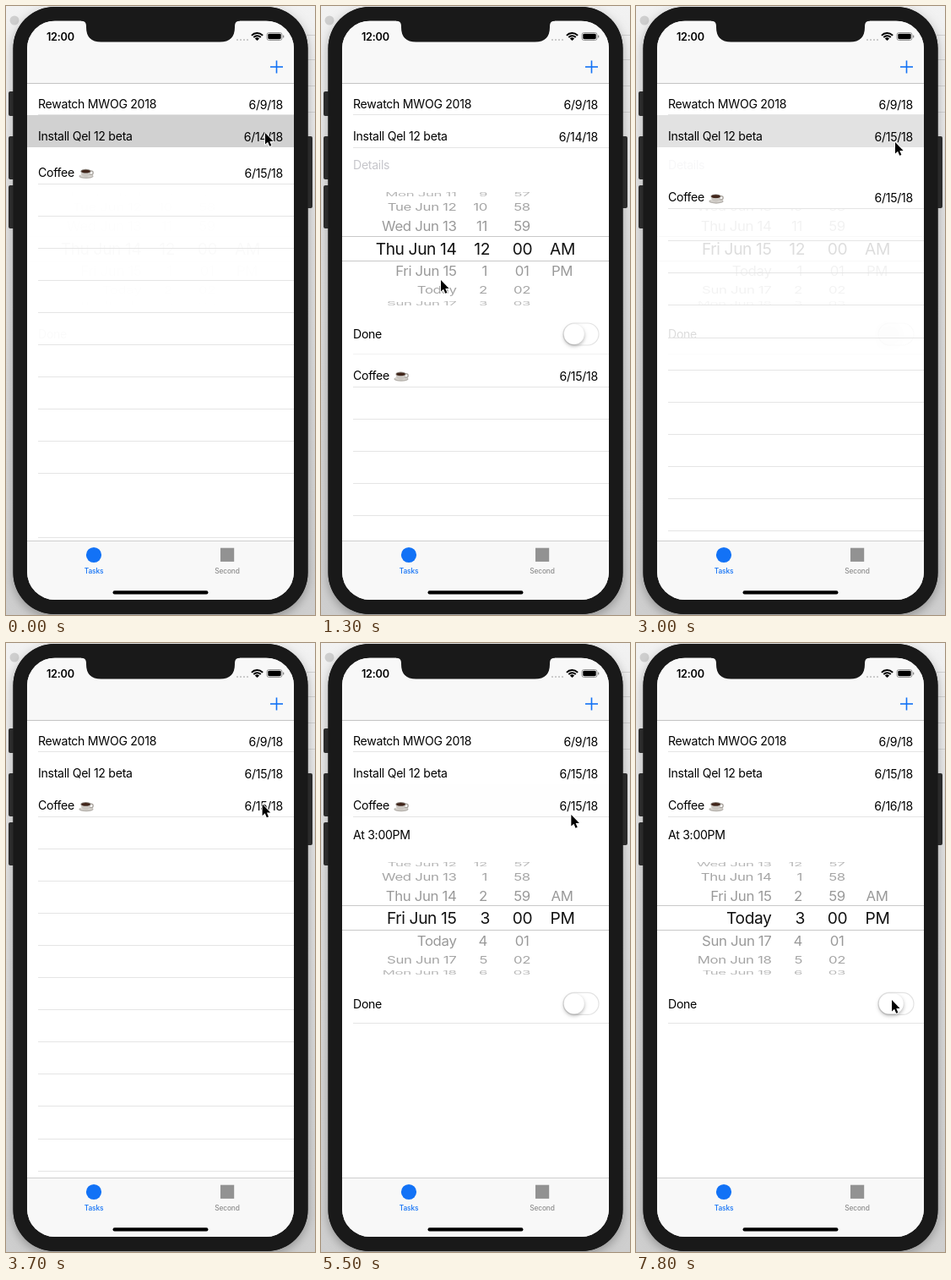
Animation of 366 by 720 pixels, one loop 8 s. Source, as an HTML page with a canvas:

```html
<!DOCTYPE html>
<html lang="en">
<head>
<meta charset="utf-8">
<title>Task list</title>
<style>
html, body { margin: 0; width: 100%; height: 100%; overflow: hidden; background: #e4e4e4; }
canvas { display: block; width: 366px; height: 720px; }
</style>
</head>
<body>
<canvas id="stage"></canvas>
<script>
const LOOP = 8000, STEP = 100;
const ROW = 38.05, PANEL = 244.5;
const TOP = 17.5, BOTTOM = 702;
const BLUE = '#1272f6', BODY = '#191919', LINE = '#e5e5e5';
const canvas = document.getElementById('stage');
const ctx = canvas.getContext('2d');
const dpr = window.devicePixelRatio || 1;
canvas.width = 366 * dpr;
canvas.height = 720 * dpr;

const ease = u => {
  u = Math.min(1, Math.max(0, u));
  return u * u * (3 - 2 * u);
};
const mix = (a, b, u) => a + (b - a) * u;

// Pointer moves: start time, end time, target position
const POINTER_START = [307, 150];
const MOVES = [
  [400, 900, 141, 323],
  [950, 1100, 142, 324],
  [1450, 2000, 307, 161],
  [3250, 3850, 303, 196],
  [5400, 6200, 148, 358],
  [7000, 7700, 303, 422]
];

function rect(x, y, w, h, color) {
  ctx.fillStyle = color;
  ctx.fillRect(x, y, w, h);
}

function round(x, y, w, h, r, color) {
  ctx.beginPath();
  ctx.roundRect(x, y, w, h, r);
  ctx.fillStyle = color;
  ctx.fill();
}

function disc(x, y, rx, ry, color) {
  ctx.beginPath();
  ctx.ellipse(x, y, rx, ry, 0, 0, 7);
  ctx.fillStyle = color;
  ctx.fill();
}

function stroke(color, width) {
  ctx.strokeStyle = color;
  ctx.lineWidth = width;
  ctx.stroke();
}

function text(str, x, y, { size = 14.1, align = 'left', color = '#000', weight = 400 } = {}) {
  ctx.font = `${weight} ${size}px Inter, sans-serif`;
  ctx.letterSpacing = -0.02 * size + 'px';
  ctx.textAlign = align;
  ctx.fillStyle = color;
  ctx.fillText(str, x, y + size * 0.364);
}

const separator = y => rect(38, Math.round(y), 303, 1, LINE);

function clipped(rects, draw) {
  ctx.save();
  ctx.beginPath();
  rects.forEach(r => ctx.rect(...r));
  ctx.clip();
  draw();
  ctx.restore();
}

function withShadow(alpha, blur, offset, draw) {
  ctx.save();
  ctx.shadowColor = `rgba(0,0,0,${alpha})`;
  ctx.shadowBlur = blur * dpr;
  ctx.shadowOffsetY = offset * dpr;
  draw();
  ctx.restore();
}

function backdrop() {
  const shade = ctx.createLinearGradient(0, 0, 0, 720);
  shade.addColorStop(0, '#f2f2f2');
  shade.addColorStop(0.35, '#e2e2e2');
  shade.addColorStop(1, '#cecece');
  rect(0, 0, 366, 720, shade);
  [34, 63, 94, 125].forEach(y => rect(350, y, 16, 1, '#d2d2d2'));
  disc(10, 17, 5.5, 5.5, '#cfcfcf');
  withShadow(0.3, 12, 4, () => round(8.5, 1, 349, 718, 49, BODY));
  [[3, 101, 29], [3, 154, 51], [3, 212, 51], [355, 154, 85]]
    .forEach(([x, y, h]) => round(x, y, 8, h, 2, '#2b2b2b'));
  round(8.5, 1, 349, 718, 49, BODY);
}

function cup(x, y) {
  disc(x, y + 4.6, 8.6, 2.7, '#b5b1ac');
  disc(x, y + 4, 7.4, 1.8, '#d8d5d0');
  ctx.beginPath();
  ctx.ellipse(x + 5.6, y + 0.4, 2.6, 2.2, 0, 0, 7);
  stroke('#a8a39d', 1.3);
  ctx.beginPath();
  ctx.ellipse(x - 0.5, y - 1.5, 6, 7, 0, 0, Math.PI);
  ctx.fillStyle = '#cbc7c2';
  ctx.fill();
  disc(x - 0.5, y - 1.5, 6, 2.4, '#8d8781');
  disc(x - 0.5, y - 1.2, 5.2, 1.8, '#41251a');
}

function row(top, title, date, highlight) {
  rect(25, top, 316, ROW, '#fff');
  if (highlight > 0) rect(25, Math.round(top), 316, 38, `rgba(0,0,0,${0.18 * highlight})`);
  text(title, 38, top + 25);
  text(date, 328, top + 26, { align: 'right' });
}

// One picker column: rows on a cylinder, with a flat magnified band in the middle
function wheel(cy, x, bandX, align, value, label, min = -99, max = 99) {
  const first = Math.max(min, Math.ceil(value - 4));
  const last = Math.min(max, Math.floor(value + 4));
  const eachRow = draw => {
    for (let i = first; i <= last; i++) draw(label(i), i - value);
  };
  clipped([[25, cy - 75, 316, 61], [25, cy + 15, 316, 61]], () => eachRow((str, k) => {
    const angle = k * 0.39;
    if (Math.abs(angle) > 1.5) return;
    ctx.save();
    ctx.translate(x, cy + 69.7 * Math.sin(angle));
    ctx.scale(1, Math.cos(angle));
    text(str, 0, 0, { size: 16.8, align, color: `rgba(0,0,0,${0.2 + 0.22 * Math.cos(angle)})` });
    ctx.restore();
  }));
  clipped([[25, cy - 14, 316, 28]], () => eachRow((str, k) =>
    text(str, bandX, cy + k * 28, { size: 19.2, align, color: '#111' })));
}

const WEEK = ['Sun', 'Mon', 'Tue', 'Wed', 'Thu', 'Fri', 'Sat'];
const dayLabel = d => d === 16 ? 'Today' : `${WEEK[(d + 4) % 7]} Jun ${d}`;
const hourLabel = h => String((h + 11) % 12 + 1);
const minuteLabel = m => String((m + 60) % 60).padStart(2, '0');

function toggle(y, pressed) {
  ctx.beginPath();
  ctx.roundRect(287, y - 13, 42, 26, 13);
  ctx.fillStyle = '#fff';
  ctx.fill();
  stroke('#e3e3e3', 1.2);
  withShadow(0.3 * ctx.globalAlpha, 4, 2, () =>
    round(287.8, y - 12, pressed ? 29 : 24, 24, 12, '#fff'));
}

function panel(top, open, { note, noteColor, day, hour, half, pressed }) {
  if (open <= 0) return;
  const cy = top + 120;
  ctx.save();
  ctx.globalAlpha = open;
  text(note, 38, top + 21, { color: noteColor });
  wheel(cy, 160.5, 160.5, 'right', day, dayLabel);
  wheel(cy, 197, 200, 'right', hour, hourLabel);
  wheel(cy, 238, 238.5, 'center', 0, minuteLabel);
  wheel(cy, 285.5, 286, 'center', half, i => i ? 'PM' : 'AM', 0, 1);
  rect(25, Math.round(cy - 15), 316, 1, '#c9c9c9');
  rect(25, Math.round(cy + 14), 316, 1, '#c9c9c9');
  text('Done', 38, top + 221);
  toggle(top + 221, pressed);
  separator(top + 244);
  ctx.restore();
}

function table(t) {
  const openFirst = ease((t + 58) / 700) - ease((t - 2465) / 700);
  const openSecond = ease((t - 4600) / 700);
  const fade = start => 1 - ease((t - start - 245) / 700);
  const firstLit = t < 2000 ? fade(-58) : t >= 2400 ? fade(2465) : 0;
  const secondLit = t >= 4300 ? fade(4600) : 0;

  panel(167, openFirst, {
    note: 'Details', noteColor: '#c6c6cb',
    day: 14 + ease((t - 1360) / 340), hour: 12, half: 0
  });
  panel(205.4, openSecond, {
    note: 'At 3:00PM', noteColor: '#000',
    day: 15 + ease((t - 6360) / 340), hour: 15, half: 1, pressed: t >= 7800
  });

  row(91, 'Rewatch MWOG 2018', '6/9/18', 0);
  row(129, 'Install Qel 12 beta', t < 1800 ? '6/14/18' : '6/15/18', firstLit);
  separator(128);
  if (firstLit <= 0) separator(166.5);

  const coffeeTop = 167 + PANEL * openFirst;
  row(coffeeTop, 'Coffee', t < 6800 ? '6/15/18' : '6/16/18', secondLit);
  cup(95, coffeeTop + 25);
  separator(coffeeTop + 38);

  // Empty rows below; the one being recycled has no line
  const recycled = t < 1000 ? 10 : t >= 4600 ? 6 : -1;
  ctx.globalAlpha = 1 - openSecond;
  for (let i = 1; i < 12; i++) {
    if (i !== recycled) separator(coffeeTop + 38 + i * ROW + PANEL * openSecond);
  }
  ctx.globalAlpha = 1;
}

function bars() {
  rect(25, TOP, 316, 91 - TOP, '#f8f8f8');
  rect(25, 91, 316, 1, '#c4c4c4');
  rect(313, 71.2, 15, 1.6, BLUE);
  rect(319.7, 64.5, 1.6, 15, BLUE);

  text('12:00', 48, 36, { size: 12.7, weight: 600 });
  for (let i = 0; i < 4; i++) disc(274 + i * 4, 40, 1.1, 1.1, '#c2c2c2');
  for (const r of [10, 6.7]) {
    ctx.beginPath();
    ctx.arc(297.5, 41, r - 1, -Math.PI * 0.76, -Math.PI * 0.24);
    stroke('#000', 2);
  }
  ctx.beginPath();
  ctx.moveTo(297.5, 41);
  ctx.arc(297.5, 41, 3.6, -Math.PI * 0.76, -Math.PI * 0.24);
  ctx.fillStyle = '#000';
  ctx.fill();
  ctx.beginPath();
  ctx.roundRect(309, 31.5, 18, 9, 2.5);
  stroke('#8c8c8c', 0.9);
  round(310.3, 32.8, 15.4, 6.4, 1.4, '#000');
  round(328, 34.5, 1.3, 3, 0.6, '#8c8c8c');

  rect(25, 632, 316, BOTTOM - 632, '#f8f8f8');
  rect(25, 632, 316, 1, '#cfcfcf');
  disc(104, 649, 9.1, 9.1, BLUE);
  rect(254, 640.7, 16.2, 16.2, '#929292');
  const label = { size: 8.4, align: 'center', weight: 500 };
  text('Tasks', 104, 668, { ...label, color: BLUE });
  text('Second', 262, 668, { ...label, color: '#8e8e8e' });
  round(126.5, 691.3, 113, 4.2, 2.1, '#000');
}

function notch() {
  ctx.fillStyle = BODY;
  ctx.fill(new Path2D('M89 16V17.5Q95 17.5 95 23.5V25Q95 42.5 112.5 42.5H253.5Q271 42.5 271 25V23.5Q271 17.5 277 17.5V16Z'));
}

function pointer(t) {
  let [x, y] = POINTER_START;
  for (const [start, end, toX, toY] of MOVES) {
    const u = ease((t - start) / (end - start));
    x = mix(x, toX, u);
    y = mix(y, toY, u);
  }
  ctx.save();
  ctx.translate(x, y);
  const arrow = new Path2D('M0 0V13.6L3.1 10.8 5.2 15.8 7.4 14.9 5.3 10H9.6Z');
  ctx.lineJoin = 'round';
  ctx.strokeStyle = '#fff';
  ctx.lineWidth = 1.8;
  ctx.stroke(arrow);
  ctx.fillStyle = '#000';
  ctx.fill(arrow);
  ctx.restore();
}

function render(now) {
  const t = Math.floor(now % LOOP / STEP) * STEP;
  ctx.setTransform(dpr, 0, 0, dpr, 0, 0);
  backdrop();
  ctx.save();
  ctx.beginPath();
  ctx.roundRect(25, TOP, 316, BOTTOM - TOP, 33);
  ctx.clip();
  rect(25, TOP, 316, BOTTOM - TOP, '#fff');
  table(t);
  bars();
  ctx.restore();
  notch();
  pointer(t);
}

let begin;
function tick(now) {
  begin ??= now;
  render(now - begin);
  requestAnimationFrame(tick);
}
requestAnimationFrame(tick);
</script>
</body>
</html>
```
